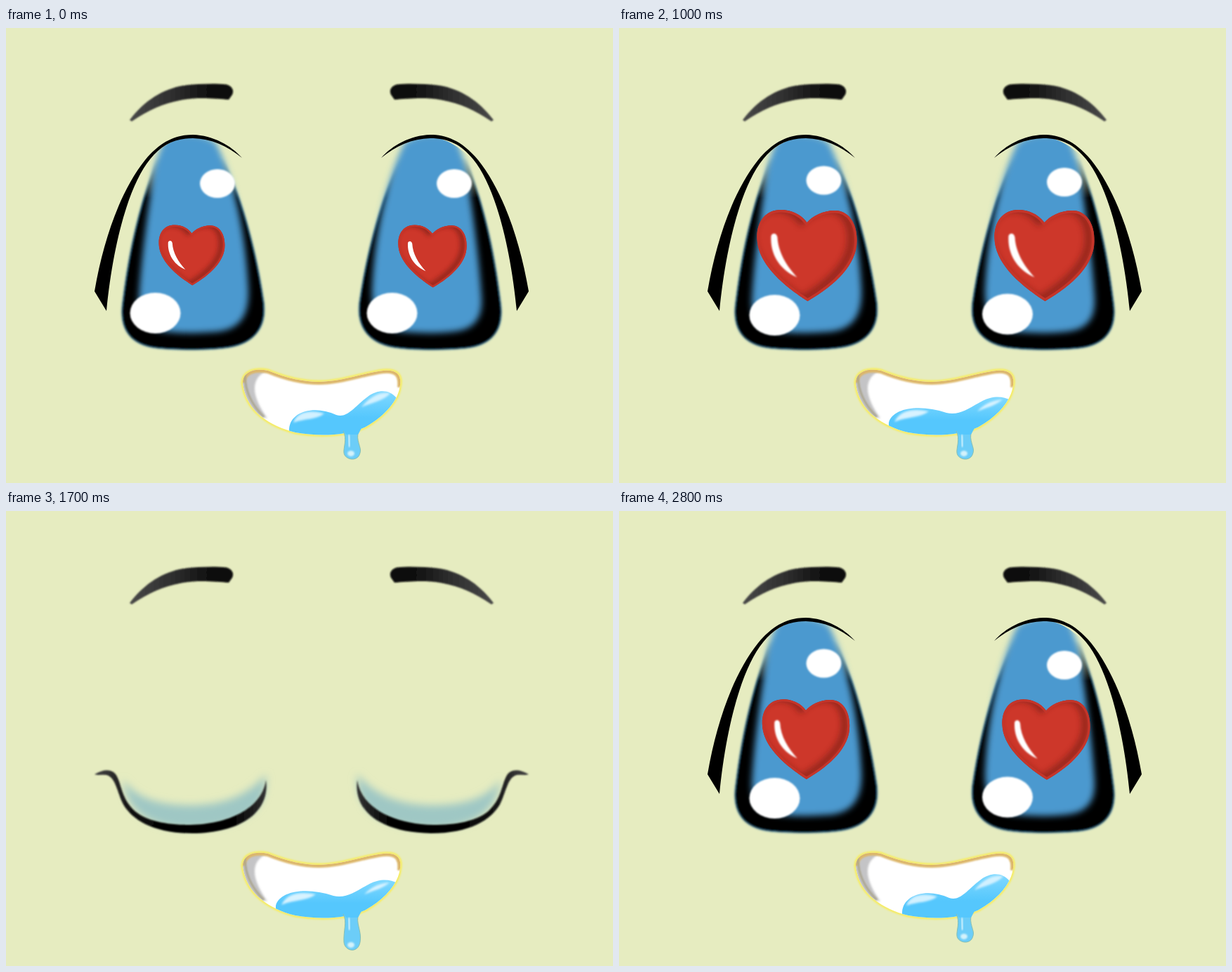
These frames come from a looping animation (864x648 px, 3000 ms). An HTML page:

```html
<!DOCTYPE html>
<html lang="en">
<head>
<meta charset="utf-8">
<title>Lovestruck face</title>
<style>
  html, body { margin: 0; width: 100%; height: 100%; overflow: hidden; background: #e6ecc0; }
  svg { display: block; width: 100vw; height: 100vh; }
</style>
</head>
<body>
<svg viewBox="0 0 864 648">
  <defs>
    <filter id="soft1" x="-20%" y="-20%" width="140%" height="140%"><feGaussianBlur stdDeviation="1"/></filter>
    <filter id="soft2" x="-20%" y="-20%" width="140%" height="140%"><feGaussianBlur stdDeviation="1.6"/></filter>
    <filter id="soft5" x="-20%" y="-20%" width="140%" height="140%"><feGaussianBlur stdDeviation="5"/></filter>
    <filter id="soft7" x="-20%" y="-30%" width="140%" height="160%"><feGaussianBlur stdDeviation="6"/></filter>
    <linearGradient id="browInk"><stop offset="0" stop-color="#484848"/><stop offset=".45" stop-color="#2c2c2c"/><stop offset=".85" stop-color="#080808"/></linearGradient>
    <linearGradient id="lidInk"><stop offset="0" stop-color="#444"/><stop offset=".25" stop-color="#080808"/><stop offset=".8" stop-color="#000"/><stop offset="1" stop-color="#333"/></linearGradient>
    <linearGradient id="fadeIn" gradientUnits="userSpaceOnUse" x1="0" y1="185" x2="0" y2="242">
      <stop offset="0" stop-color="#000"/><stop offset="1" stop-color="#fff"/>
    </linearGradient>
    <mask id="rimMask" maskUnits="userSpaceOnUse" x="100" y="100" width="320" height="400"><rect x="100" y="100" width="320" height="400" fill="url(#fadeIn)"/></mask>
    <clipPath id="irisClip"><path d="M100 320 L207 184 C224 166 245 155 266 155 C292 155 312 164 337 185 L420 320 V480 H100Z"/></clipPath>
    <linearGradient id="water" x1="0" y1="0" x2="0" y2="1"><stop offset="0" stop-color="#80d9ff"/><stop offset=".6" stop-color="#55c7fd"/></linearGradient>

    <path id="heartShape" d="M0 -47 C-10 -60 -24 -65 -37 -65 C-59 -65 -72 -48 -71 -24 C-70 8 -41 38 1 65 C41 42 71 12 71 -20 C72 -46 59 -64 40 -64 C22 -64 8 -56 0 -47Z"/>
    <clipPath id="heartClip"><use href="#heartShape"/></clipPath>
    <g id="heart">
      <use href="#heartShape" fill="#cd372a"/>
      <g clip-path="url(#heartClip)">
        <use href="#heartShape" x="-8" y="-2" fill="none" stroke="#6f1d16" stroke-width="10" opacity=".65" filter="url(#soft5)"/>
        <use href="#heartShape" fill="none" stroke="#c5352a" stroke-width="7"/>
      </g>
      <path d="M-51 -28 C-49 -33 -43 -32 -42 -26 C-41 -5 -29 15 -14 31 C-36 22 -53 0 -51 -28Z" fill="#fff" filter="url(#soft1)"/>
    </g>

    <path id="brow" d="M176 131 C198 102 224 87 252 82 C275 79 300 79 314 80.5 C322 83 325 89 322 95 L317 102 C300 101 275 98 250 102.5 C222 108 203 117 179 133Z" fill="url(#browInk)" filter="url(#soft1)"/>

    <g id="rim" mask="url(#rimMask)">
      <path d="M222 165 C240 152 285 152 299 167 C327 215 354 300 367 390 C372 428 352 452 310 456 C285 459 245 459 215 456 C178 452 160 430 166 390 C176 310 190 250 222 165Z" stroke="#3b7ea8" stroke-width="1" filter="url(#soft2)"/>
    </g>
    <g id="iris" clip-path="url(#irisClip)">
      <path d="M226 158 C245 148 280 148 299 164 C324 215 341 290 345 370 C347 412 331 431 296 433 C270 435 245 435 225 432 C198 428 188 412 189 385 C193 320 203 255 211 200 C215 184 220 172 226 158Z" fill="#4c99cf" filter="url(#soft5)"/>
    </g>
    <path id="lash" d="M126 375 C139 300 163 232 198 188 C222 159 245 152 266 152 C295 153 320 167 336 185 C315 168 292 157.5 266 157 C240 157 222 166 205 187 C174 225 152 310 143 403Z"/>

    <g id="shutEye">
      <path d="M166 382 C185 410 220 419 265 419 C310 418 345 405 370 375 C372 425 340 450 265 452 C200 452 170 425 166 382Z" fill="#9fc7c4" filter="url(#soft7)"/>
      <path d="M126 375 C140 367 152 367 158 378 C165 392 165 410 183 427 C200 442 230 447 262 447 C315 446 364 425 370 383 C376 425 340 458 265 459 C210 459 180 440 167 418 C158 400 156 379 143 376 C137 375 132 377 126 375Z" fill="url(#lidInk)" filter="url(#soft1)"/>
    </g>

    <path id="lips" d="M337 505 C338 489 354 484 373 488 C400 499 425 504 445 504 C478 504 510 491 537 488 C556 486 563 494 561 508 C559 530 540 552 512 568 C485 581 445 582 412 576 C375 567 341 545 337 505Z"/>
    <clipPath id="lipClip"><use href="#lips"/></clipPath>
  </defs>

  <rect width="864" height="648" fill="#e6ecc0"/>
  <use href="#brow"/>
  <use href="#brow" transform="translate(870) scale(-1 1)"/>

  <g id="open">
    <use href="#rim"/>
    <use href="#iris"/>
    <use href="#lash"/>
    <g transform="translate(870) scale(-1 1)">
      <use href="#rim"/>
      <use href="#iris" x="4"/>
      <use href="#lash"/>
    </g>
    <g id="glints" fill="#fff" filter="url(#soft1)"></g>
    <use href="#heart" class="heart"/>
    <use href="#heart" class="heart"/>
  </g>
  <g id="shut">
    <use href="#shutEye"/>
    <use href="#shutEye" transform="translate(870) scale(-1 1)"/>
  </g>

  <use href="#lips" fill="#fff" stroke="#f6ec62" stroke-width="5" filter="url(#soft1)"/>
  <use href="#lips" fill="#fff"/>
  <g clip-path="url(#lipClip)">
    <path d="M334 486 L372 488 C350 497 346 520 372 556 L350 550 L334 520Z" fill="#c4c4c6" filter="url(#soft2)"/>
    <path d="M337 505 C338 489 354 484 373 488 C400 499 425 504 445 504 C478 504 510 491 537 488 C556 486 563 494 561 512" fill="none" stroke="#dcb669" stroke-width="8" filter="url(#soft1)"/>
    <path d="M340 488 C339 505 343 530 367 554" fill="none" stroke="#aaa590" stroke-width="3" filter="url(#soft1)"/>
    <g id="smallPool">
      <path d="M403 580 V571 C405 545 440 537 470 551 C486 557 498 537 515 525 C530 514 546 515 556 527 V580Z" fill="url(#water)"/>
      <path d="M409 562 C414 546 434 543 453 549 C442 558 426 556 409 562Z M506 540 C520 523 533 518 547 520 C538 531 522 533 506 540Z" fill="#d2f1ff" filter="url(#soft2)"/>
    </g>
    <g id="widePool">
      <path d="M384 580 V562 C390 540 430 536 466 548 C490 554 508 532 528 527 C540 524 549 526 558 530 V580Z" fill="url(#water)"/>
      <path d="M392 561 C399 545 418 541 441 546 C427 556 410 553 392 561Z M510 546 C522 533 534 530 546 529 C536 538 524 540 510 546Z" fill="#d8f3ff" filter="url(#soft2)"/>
    </g>
  </g>
  <g id="drip">
    <path id="drop" fill="#6ccdf8" stroke="#86bfb2" stroke-width="1"/>
    <path d="M478 570 H506 L501 579 H484Z" fill="#55c7fd"/>
    <path d="M488 581 L489 595" stroke="#b9e9fc" stroke-width="4" stroke-linecap="round" filter="url(#soft1)"/>
    <ellipse id="shine" cx="491" rx="5" ry="4" fill="#d3f2fb" filter="url(#soft1)"/>
  </g>
</svg>
<script>
const LOOP = 3000;

// start ms, heart size (null = eyes shut), glint pose, drool pose
const STEPS = [
  [0, 'S', 'A', 'small'], [200, 'L', 'B', 'long'], [400, 'M', 'C', 'small'],
  [600, 'L', 'B', 'small'], [800, 'XL', 'C', 'long'], [1000, 'L', 'B', 'wide'],
  [1200, null, 'B', 'long'], [1300, 'L', 'B', 'small'], [1500, 'XL', 'B', 'small'],
  [1700, null, 'B', 'long'], [1800, 'L', 'C', 'small'], [2000, 'S', 'B', 'long'],
  [2200, 'S', 'C', 'small'], [2400, 'M', 'B', 'wide'], [2600, 'L', 'C', 'long'],
  [2800, 'M', 'B', 'small']
];

// x, y, scale for the left and right heart
const HEARTS = {
  S: [[264.5, 323.5, .66], [607, 325, .685]],
  M: [[266, 325, .875], [608, 325.5, .88]],
  L: [[267.5, 324, 1], [605.5, 324, 1]],
  XL: [[266.5, 324, 1.2], [603, 324, 1.17]]
};

// upper left, lower left, upper right, lower right centres
const GLINTS = {
  A: [[301, 221.5], [212.5, 406], [638, 221.5], [549.5, 406]],
  B: [[291.5, 217], [221.5, 409], [634, 219.5], [553, 407.5]],
  C: [[305, 224], [207, 413], [641, 223], [546, 408]]
};

const dropPath = (bottom, bulge) =>
  `M480 574 C486 585 480 598 481 ${bulge} C482 ${bottom} 501 ${bottom + 4} 504 ${bulge} ` +
  `C507 598 497 587 502 574Z`;

const $ = id => document.getElementById(id);
const hearts = document.querySelectorAll('.heart');
const glints = GLINTS.A.map((_, i) => {
  const e = document.createElementNS('http://www.w3.org/2000/svg', 'ellipse');
  e.setAttribute('rx', i % 2 ? 36 : 25);
  e.setAttribute('ry', i % 2 ? 29 : 20.5);
  return $('glints').appendChild(e);
});
const show = (id, on) => { $(id).style.display = on ? '' : 'none'; };

function pose([, size, glint, drool]) {
  show('open', size);
  show('shut', !size);
  if (size) hearts.forEach((h, i) => {
    const [x, y, s] = HEARTS[size][i];
    h.setAttribute('transform', `translate(${x} ${y}) scale(${s})`);
  });
  glints.forEach((e, i) => {
    const [x, y] = GLINTS[glint][i];
    e.setAttribute('cx', x);
    e.setAttribute('cy', y);
  });
  const long = drool === 'long';
  show('smallPool', drool === 'small');
  show('widePool', drool !== 'small');
  $('drop').setAttribute('d', long ? dropPath(627, 614) : dropPath(615, 605));
  $('shine').setAttribute('cy', long ? 618 : 606);
}

let current;
const start = performance.now();
function tick() {
  const t = (performance.now() - start) % LOOP;
  const step = STEPS.findLast(s => s[0] <= t);
  if (step !== current) pose(current = step);
  requestAnimationFrame(tick);
}
tick();
</script>
</body>
</html>
```
